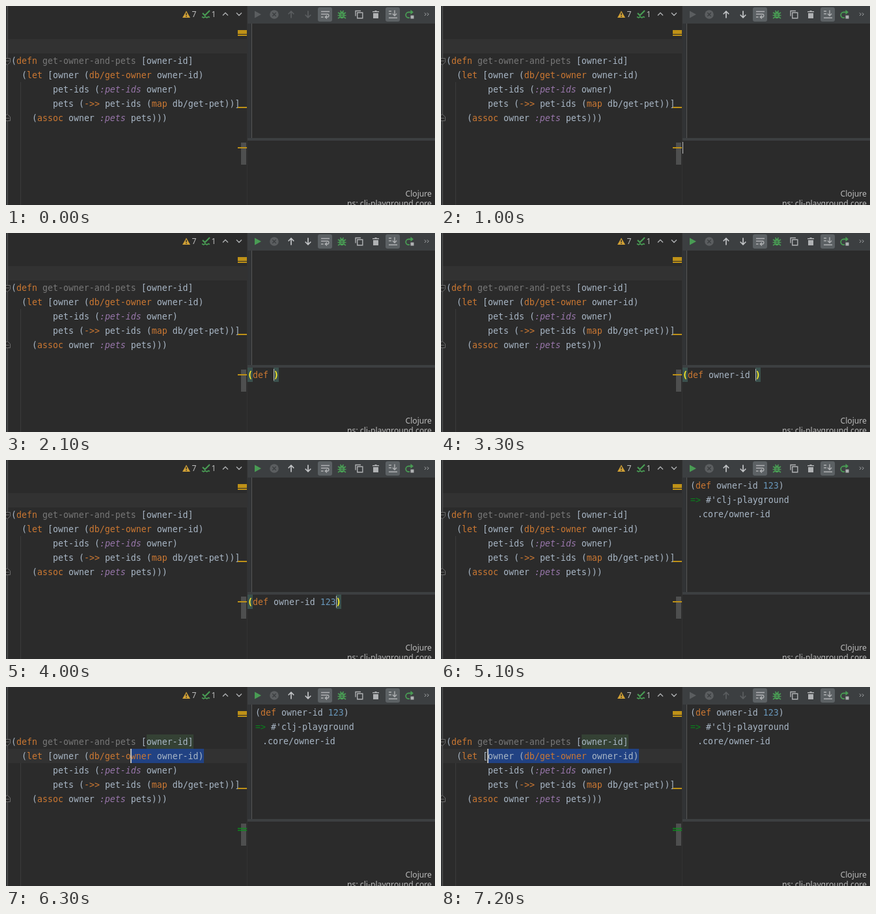
Animation of 659x306 px, one loop 8 s. Source, as an HTML page:

```html
<!DOCTYPE html>
<html lang="en">
<head>
<meta charset="utf-8">
<title>REPL session</title>
<style>
  html, body { margin: 0; width: 100%; height: 100%; overflow: hidden; background: #2b2b2b; }
  svg { display: block; }
  text { white-space: pre; }
  .code { font: 13.288px "DejaVu Sans Mono", "Liberation Mono", monospace; font-variant-ligatures: none; fill: #a9b7c6; }
  .ui { font: 12.2px "Noto Sans", "Open Sans", sans-serif; fill: #bbb; }
  .k { fill: #cc7832; }
  .u { fill: #787878; }
  .p { fill: #9876aa; font-style: italic; }
  .n { fill: #6897bb; }
  .g { fill: #0a7f1c; }
  .m { fill: #ffef28; font-weight: bold; }
  .line { fill: none; stroke: #afb1b3; stroke-width: 1.4; }
  .mark { fill: #be9117; }
</style>
</head>
<body>
<svg width="659" height="306" viewBox="0 0 659 306">
  <rect width="659" height="306" fill="#2b2b2b"/>

  <!-- editor -->
  <rect width="2" height="306" fill="#313335"/>
  <rect id="row" x="3" width="367" height="22" fill="#323232"/>
  <rect x="2" width="1" height="306" fill="#555"/>
  <rect x="22" y="117" width="1" height="189" fill="#3b3b3b"/>
  <rect id="usage" x="216" y="73" width="72" height="22" fill="#344134"/>
  <rect id="sel" y="95" height="22" fill="#214283"/>
  <g id="code"></g>
  <rect id="cursor" y="95" width="2" height="22" fill="#bbb"/>
  <g fill="#2b2b2b" stroke="#6c6c6c">
    <path d="M-3.5 80.5H6.5V86.5L2 90.5L-3.5 86.5ZM0 84.5H4.5"/>
    <path d="M-3.5 176.5H6.5V170.5L2 166.5L-3.5 170.5ZM0 172.5H4.5"/>
  </g>

  <!-- inspections and error stripe -->
  <path d="M277 7.5L283 18H271Z" fill="#d0a035"/>
  <path d="M277 10.5V14M277 15.2V16.7" stroke="#2b2b2b" stroke-width="1.5"/>
  <g fill="none" stroke="#499c54" stroke-width="2.2">
    <path d="M302 11L305.5 14.5L313 7"/>
    <path d="M301 16.5L303.5 18L306 16.5L308.5 18L311 16.5L313 17.5" stroke-width="1.6"/>
  </g>
  <text class="ui" x="285.5" y="17">7</text>
  <text class="ui" x="315.5" y="17">1</text>
  <path class="line" d="M333 14.5L337 10.5L341 14.5M354 10.5L358 14.5L362 10.5"/>
  <rect x="361" y="210" width="8" height="34" fill="#4e4f4f"/>
  <g class="mark">
    <rect x="356" y="37" width="14" height="6"/>
    <rect x="356" y="44" width="14" height="2"/>
    <rect x="356" y="155" width="14" height="2"/>
    <rect id="warn" x="356" y="217" width="14" height="2"/>
  </g>
  <path id="uses" d="M356 217.5H370M356 220.5H370" stroke="#0d8a1d" stroke-width="1.6"/>

  <!-- console -->
  <rect x="370" width="1" height="306" fill="#323232"/>
  <rect x="371" width="288" height="27" fill="#3c3f41"/>
  <rect x="371" y="27" width="6" height="176" fill="#313335"/>
  <rect x="377" y="27" width="1" height="176" fill="#555"/>
  <rect x="371" y="203" width="288" height="4" fill="#3c3f41"/>
  <g id="echo"></g>
  <g id="result"></g>
  <g id="input"></g>
  <rect id="caret" y="209" width="1" height="18" fill="#bbb"/>
  <text class="ui" x="654" y="293" text-anchor="end">Clojure</text>
  <text class="ui" x="654" y="308" text-anchor="end">ns: clj-playground.core</text>

  <!-- toolbar -->
  <path id="run" d="M382 7.5L392 13L382 18.5Z"/>
  <g id="stop">
    <circle cx="412" cy="13" r="6.8"/>
    <path d="M409.3 10.3L414.7 15.7M414.7 10.3L409.3 15.7" stroke="#3c3f41" stroke-width="1.5"/>
  </g>
  <path id="arrows" fill="none" stroke-width="1.7" d="M438 18.5V8.5M433.7 12.5L438 8.2L442.3 12.5M464 7.5V17.5M459.7 13.5L464 17.8L468.3 13.5"/>
  <rect x="479" y="2" width="22" height="22" rx="3" fill="#5c6164"/>
  <path class="line" d="M484 8.5H497M484 12.5H494.5A2.5 2.5 0 0 1 494.5 17H491M493 14.5L490.3 17L493 19.5M484 17H487.5"/>
  <g fill="#499c54" stroke="#499c54">
    <ellipse cx="516" cy="14" rx="4" ry="5.2" stroke="none"/>
    <path fill="none" stroke-width="1.6" d="M510 10L513 12M522 10L519 12M509.5 14.5H522.5M510 19L513 17M522 19L519 17M513.5 7L515 9.5M518.5 7L517 9.5"/>
    <path d="M514 12.8H518M514 15.5H518" stroke="#3c3f41"/>
  </g>
  <path class="line" d="M537 15.5V7.5H545M539.7 10.2H547.8V18.8H539.7Z"/>
  <path fill="#afb1b3" d="M563 8H566L567 7H569L570 8H573V9.5H563ZM564 11H572V19H564Z"/>
  <rect x="583" y="2" width="22" height="22" rx="3" fill="#5c6164"/>
  <path class="line" d="M588 8H592M588 12H592M588 18.3H601M597 6.5V14.5M593.8 11.8L597 15L600.2 11.8"/>
  <path fill="none" stroke="#499c54" stroke-width="1.8" d="M622 9.5H618.5A4.3 4.3 0 0 0 618.5 18.2H620"/>
  <path fill="#499c54" d="M621.5 5.8L626 9.5L621.5 13.2Z"/>
  <rect x="621.5" y="14.5" width="5" height="5" fill="#afb1b3"/>
  <path fill="none" stroke="#afb1b3" d="M643 10.5L645.2 12.7L643 14.9M647 10.5L649.2 12.7L647 14.9"/>
</svg>
<script>
const LOOP = 8000, CELL = 8;
const $ = id => document.getElementById(id);
const show = (id, on) => $(id).style.display = on ? "" : "none";

// A line is a string in which {c:text} gives text the class c.
const line = (x, y, s) => `<text class="code" x="${x}" y="${y}">` +
  s.replace(/>/g, "&gt;").replace(/\{(\w):([^}]*)\}/g, '<tspan class="$1">$2</tspan>') + "</text>";

$("code").innerHTML = [
  [0, "({k:defn} {u:get-owner-and-pets} [owner-id]"],
  [2, "({k:let} [owner ({k:db/get-owner} owner-id)"],
  [8, "pet-ids ({p::pet-ids} owner)"],
  [8, "pets ({k:->>} pet-ids ({k:map} db/get-pet))]"],
  [4, "({k:assoc} owner {p::pets} pets)))"]
].map(([col, s], i) => line(8 + col * CELL, 89 + i * 22, s)).join("");

$("echo").innerHTML = line(383, 44, "({k:def} owner-id {n:123})");
$("result").innerHTML = line(383, 66, "{g:=>} #'clj-playground") + line(394, 88, ".core/owner-id");

const FORM = "def owner-id 123";

// typed: characters between the parens, -1 for an empty prompt
function drawInput(typed, match) {
  if (typed < 0) return "";
  const s = FORM.slice(0, typed), end = 371 + (typed + 1) * CELL;
  const paren = c => match ? `{m:${c}}` : c;
  const back = x => match ? `<rect x="${x}" y="207" width="8" height="22" fill="#3b514d"/>` : "";
  const part = (cls, t) => t && `{${cls}:${t}}`;
  return back(371) + back(end) + line(371, 223,
    paren("(") + part("k", s.slice(0, 3)) + s.slice(3, 13) + part("n", s.slice(13)) + paren(")"));
}

const base = { typed: -1, match: false, caret: false, run: false, stop: false, arrows: false,
               out: 0, cursor: 0, usage: false };

// Each step changes some of the state from its time on.
const steps = [
  [0, {}],
  [400, { caret: true }],
  [1000, { arrows: true }],
  [1100, { run: true, caret: false }],
  [1400, { typed: 0, caret: true }],
  [1500, { match: true }],
  [1700, { typed: 1 }],
  [1900, { typed: 2 }],
  [2000, { typed: 3 }],
  [2100, { typed: 4 }],
  [2300, { typed: 5 }],
  [2400, { typed: 6 }],
  [2500, { typed: 7 }],
  [3300, { typed: 13 }],
  [3800, { typed: 14 }],
  [3900, { typed: 15 }],
  [4000, { typed: 16 }],
  [4500, { typed: -1, match: false, out: 1, stop: true }],
  [4600, { out: 2 }],
  [5100, { stop: false, caret: false }],
  [5500, { caret: true }],
  [6000, { caret: false, cursor: 304 }],
  [6100, { cursor: 272, usage: true }],
  [6200, { cursor: 232 }],
  [6300, { cursor: 192 }],
  [6500, { cursor: 136, run: false, arrows: false }],
  [6600, { cursor: 104 }],
  [6800, { cursor: 88 }],
  [6900, { cursor: 80 }],
  [7200, { cursor: 72 }]
];
let state = base;
const states = steps.map(([at, change]) => ({ at, ...(state = { ...state, ...change }) }));

function draw(s) {
  $("input").innerHTML = drawInput(s.typed, s.match);
  $("caret").setAttribute("x", 371 + (s.typed + 1) * CELL);
  show("caret", s.caret);

  $("run").setAttribute("fill", s.run ? "#499c54" : "#5b5e60");
  $("stop").setAttribute("fill", s.stop ? "#afb1b3" : "#5b5e60");
  $("arrows").setAttribute("stroke", s.arrows ? "#c4c6c8" : "#5b5e60");
  show("echo", s.out > 0);
  show("result", s.out > 1);

  $("row").setAttribute("y", s.cursor ? 95 : 51);
  $("cursor").setAttribute("x", s.cursor - 1);
  $("sel").setAttribute("x", s.cursor);
  $("sel").setAttribute("width", s.cursor ? 304 - s.cursor : 0);
  show("cursor", s.cursor);
  show("usage", s.usage);
  show("uses", s.usage);
  show("warn", !s.usage);
}

const start = performance.now();
let last;
function tick() {
  const t = (performance.now() - start) % LOOP;
  const now = states.filter(s => s.at <= t).pop();
  if (now !== last) draw(last = now);
  requestAnimationFrame(tick);
}
tick();
</script>
</body>
</html>
```
